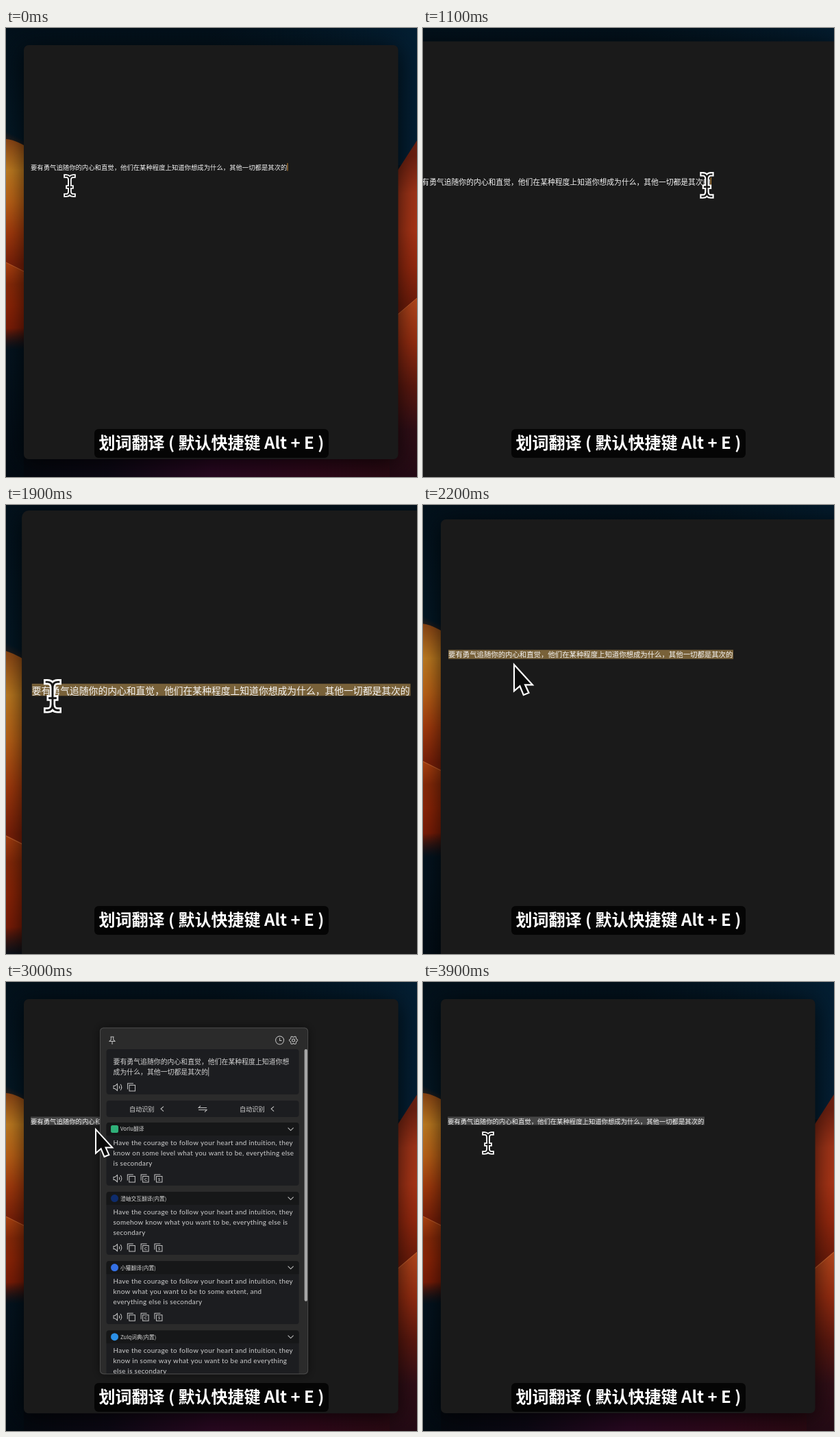
An HTML page with a canvas that plays this animation: 600 by 655 pixels, repeating every 4 s.

```html
<!DOCTYPE html>
<html lang="zh-CN">
<head>
<meta charset="utf-8">
<style>
html, body { margin: 0; width: 100%; height: 100%; overflow: hidden; background: #000; }
canvas { display: block; }
</style>
</head>
<body>
<canvas id="stage" width="600" height="655"></canvas>
<script>
const ctx = document.getElementById('stage').getContext('2d');
const CJK = '"Noto Sans CJK SC", "Noto Sans CJK", sans-serif';
const LATIN = 'Lato, "Noto Sans CJK SC", sans-serif';
const LOOP = 4000, PANEL_OPEN = 2300, PANEL_CLOSE = 3750, DRAG = 1150, DROP = 1550;
const SENTENCE = '要有勇气追随你的内心和直觉\uff0c他们在某种程度上知道你想成为什么\uff0c其他一切都是其次的';

const FIRST = 'Have the courage to follow your heart and intuition, they';
const services = [
  { name: 'Vorlu翻译', color: '#2fb079', square: true, start: 2300,
    lines: [FIRST, 'know on some level what you want to be, everything else', 'is secondary'] },
  { name: '澄岫交互翻译(内置)', color: '#0e2c6c', start: 2495,
    lines: [FIRST, 'somehow know what you want to be, everything else is', 'secondary'] },
  { name: '小獾翻译(内置)', color: '#3470e4', start: 2495,
    lines: [FIRST, 'know what you want to be to some extent, and', 'everything else is secondary'] },
  { name: 'Zulq词典(内置)', color: '#2b8fe6', start: 2620,
    lines: [FIRST, 'know in some way what you want to be and everything', 'else is secondary'] },
  { name: 'Nemvo翻译', color: '#dfe6ee', square: true, start: 2820, lines: [] }
];

const icons = {
  pin: 'M-2.5-5H2.5M-1.7-5V-1L-4 1.5H4L1.7-1V-5M0 1.5V6',
  clock: 'M6 0A6 6 0 1 1-6 0A6 6 0 1 1 6 0M0-3.5V.5H3',
  speaker: 'M-6-2H-4L-.5-5V5L-4 2H-6ZM2-2Q3.5 0 2 2M4-4.5Q7.5 0 4 4.5',
  copy: 'M-3-3H5.5V5.5H-3ZM-5.5 3V-5.5H3',
  swap: 'M6-1.5H-6L-3-4.5M-6 1.5H6L3 4.5',
  left: 'M2-3.5L-2 0L2 3.5',
  down: 'M-4-2L0 2L4-2'
};
for (const key in icons) icons[key] = new Path2D(icons[key]);
const beamPath = new Path2D('M-6-14H-5Q0-14 0-8V8Q0 14-5 14H-6M6-14H5Q0-14 0-8V8Q0 14 5 14H6M-3 2H3');
const arrowPath = new Path2D('M1 2V32L8 26L13 38L18 36L13 25H22Z');

const clamp = (v, lo, hi) => Math.min(hi, Math.max(lo, v));

// Critically damped spring going from 0 to 1
function spring(ms) {
  const x = Math.max(0, ms) * .0086;
  return 1 - (1 + x) * Math.exp(-x);
}

const cursorKeys = [
  [500, 93, 230], [1050, 406, 207], [DRAG, 406, 207], [DROP, 33, 206], [1750, 33, 206],
  [2200, 122.5, 216.5], [2450, 131, 215.5], [3400, 131, 215.5], [3700, 95, 235]
];
function cursorAt(t) {
  let a = cursorKeys[0], b = a;
  for (const key of cursorKeys) {
    a = b; b = key;
    if (key[0] >= t) break;
  }
  const p = clamp((t - a[0]) / (b[0] - a[0] || 1), 0, 1), e = p * p * (3 - 2 * p);
  return [a[1] + (b[1] - a[1]) * e, a[2] + (b[2] - a[2]) * e];
}

function text(str, x, y, size, color, family = CJK, weight = 400) {
  ctx.font = `${weight} ${size}px ${family}`;
  ctx.fillStyle = color;
  ctx.fillText(str, x, y);
}
function box(x, y, w, h, r, color) {
  ctx.beginPath();
  ctx.roundRect(x, y, w, h, r);
  ctx.fillStyle = color;
  ctx.fill();
}
function icon(name, x, y) {
  ctx.save();
  ctx.translate(x, y);
  ctx.strokeStyle = '#c4c4c4';
  ctx.lineWidth = 1;
  ctx.stroke(icons[name]);
  ctx.restore();
}
function gear(x, y) {
  ctx.beginPath();
  for (let i = 0; i <= 48; i++) {
    const a = i / 48 * Math.PI * 2, r = 5.4 + .8 * Math.cos(a * 6);
    ctx.lineTo(x + r * Math.cos(a), y + r * Math.sin(a));
  }
  ctx.moveTo(x + 2, y);
  ctx.arc(x, y, 2, 0, 7);
  ctx.strokeStyle = '#c4c4c4';
  ctx.lineWidth = 1;
  ctx.stroke();
}
function gradient(x0, y0, x1, y1, ...colors) {
  const g = ctx.createLinearGradient(x0, y0, x1, y1);
  colors.forEach((c, i) => g.addColorStop(i / (colors.length - 1), c));
  return g;
}
function shape(path, fill) {
  ctx.fillStyle = fill;
  ctx.fill(new Path2D(path));
}

function wallpaper() {
  ctx.fillStyle = gradient(0, 0, 0, 655, '#02101a', '#031724', '#031724', '#03121d', '#020a12');
  ctx.fillRect(0, 0, 600, 655);
  ctx.fillStyle = gradient(0, 0, 600, 0, '#03162200', '#03182600', '#031e32');
  ctx.fillRect(0, 0, 600, 200);
  ctx.fillStyle = gradient(0, 0, 600, 0, '#02080e', '#0c0814', '#2a0822', '#30081a', '#2a0a10');
  ctx.fillRect(26, 625, 574, 30);
  // left petals, soft at their outer ends
  shape('M0 145H40V375H0Z', gradient(0, 150, -14, 178, '#5a200800', '#8a4414'));
  shape('M0 162Q16 163 40 180V375H0Z', gradient(0, 162, 0, 345, '#8a4414', '#c07c20', '#bc6216', '#a43a0c', '#7c2008'));
  shape('M0 342L40 362V480H0Z', gradient(0, 342, 8, 470, '#b04410', '#8a2a08', '#8c2406', '#7c1c06', '#30100a00'));
  // right petals
  shape('M600 164L560 226V440H600Z', gradient(572, 190, 600, 400, '#6c2010', '#a03418', '#a83416', '#94280e', '#701c0a'));
  shape('M600 394L560 428V655H600Z', gradient(0, 394, 0, 650, '#b4481c', '#942c10', '#5c180e', '#300e16', '#240a14'));
  ctx.lineWidth = 1;
  ctx.strokeStyle = '#c4602c';
  ctx.stroke(new Path2D('M0 342L40 362M600 394L560 428'));
}

function editor(t) {
  ctx.save();
  ctx.shadowColor = 'rgba(0,0,0,.75)';
  ctx.shadowBlur = 34;
  ctx.shadowOffsetY = 6;
  box(26, 25, 546.5, 604, 7, '#1a1a1a');
  ctx.restore();
  if (t >= DRAG) {
    const x = clamp(cursorAt(Math.min(t, DROP))[0], 36, 411);
    ctx.fillStyle = t < PANEL_OPEN ? '#786139' : '#464646';
    ctx.fillRect(x, 196.5, 411 - x, 12);
  }
  text(SENTENCE, 36, 203, 9.375, '#f4f4f4');
  if (t < DRAG) {
    ctx.fillStyle = '#c98a35';
    ctx.fillRect(410.5, 197, 1, 11.5);
  }
}

function serviceCard(s, y, w, h, open) {
  ctx.save();
  ctx.beginPath();
  ctx.roundRect(146.5, y, w, h, 4);
  ctx.clip();
  ctx.fillStyle = '#1c1d20';
  ctx.fillRect(146, y, w + 1, h);
  ctx.fillStyle = '#161718';
  ctx.fillRect(146, y, w + 1, 19);
  box(153, y + 4, 11, 11, s.square ? 2.5 : 5.5, s.color);
  text(s.name, 167, y + 9.5, 7.75, '#d6d6d6');
  icon(open ? 'down' : 'left', 134.5 + w, y + 9.5);
  if (open) {
    ctx.letterSpacing = '.29px';
    s.lines.forEach((line, i) => text(line, 156.5, y + 30 + i * 14.8, 9.9, '#d0d0d0', LATIN));
    ctx.letterSpacing = '0px';
    ['speaker', 'copy', 'copy', 'copy'].forEach((name, i) => icon(name, 163 + i * 19.8, y + 81.5));
    text('C', 202, y + 83, 6, '#c4c4c4', LATIN, 700);
    text('S', 222, y + 83, 6, '#c4c4c4', LATIN, 700);
  } else {
    const x = 172 + ctx.measureText(s.name).width;
    [1.2, .8, 1.2].forEach((r, i) => box(x + i * 5.5 - r, y + 9.5 - r, r * 2, r * 2, r, '#b0b0b0'));
  }
  ctx.restore();
}

function panel(t) {
  const opened = services.map(s => 1 - (1 - clamp((t - s.start) / 200, 0, 1)) ** 2);
  const heights = opened.map(p => 19 + 73 * p);
  const end = heights.reduce((sum, h) => sum + h + 9, 205);
  const bottom = Math.min(572, end), scrolls = end > 572;
  const w = scrolls ? 281 : 285;

  ctx.save();
  ctx.shadowColor = 'rgba(0,0,0,.5)';
  ctx.shadowBlur = 14;
  box(137, 66.5, 304, bottom - 66.5, 5, '#2b2b2b');
  ctx.restore();
  ctx.save();
  ctx.beginPath();
  ctx.roundRect(137, 66.5, 304, bottom - 66.5, 5);
  ctx.clip();

  icon('pin', 155, 85);
  icon('clock', 399.5, 85);
  gear(419.5, 85);

  box(146.5, 98, w, 66, 4, '#1c1d20');
  const split = scrolls ? 26 : 27, rest = SENTENCE.slice(split);
  text(SENTENCE.slice(0, split), 156.5, 116, 9.9, '#d4d4d4');
  text(rest, 156.5, 131, 9.9, '#d4d4d4');
  ctx.fillRect(157 + ctx.measureText(rest).width, 124.5, .8, 13);
  icon('speaker', 163, 153.5);
  icon('copy', 183, 153.5);

  box(146.5, 173, w, 24, 4, '#1c1d20');
  const second = 341 + (w - 281) * .75;
  text('自动识别', 180, 185, 9.1, '#d4d4d4');
  text('自动识别', second, 185, 9.1, '#d4d4d4');
  icon('left', 228, 185);
  icon('left', second + 48, 185);
  icon('swap', 146.5 + w / 2, 185);

  let y = 205;
  services.forEach((s, i) => {
    serviceCard(s, y, w, heights[i], opened[i] > 0);
    y += heights[i] + 9;
  });
  if (scrolls) box(435.5, 98, 4.5, 474 * 474 / (end - 98), 2.2, '#a6a6a6');
  ctx.restore();

  ctx.beginPath();
  ctx.roundRect(137.5, 67, 303, bottom - 67.5, 5);
  ctx.strokeStyle = '#4b4b4b';
  ctx.lineWidth = 1;
  ctx.stroke();
}

function pointer(t) {
  const arrow = t > 2100 && t < 3580;
  ctx.save();
  ctx.translate(...cursorAt(t));
  ctx.strokeStyle = '#fff';
  if (arrow) {
    ctx.lineWidth = 4;
    ctx.stroke(arrowPath);
    ctx.fillStyle = '#0a0a0a';
    ctx.fill(arrowPath);
  } else {
    ctx.lineCap = 'square';
    ctx.lineWidth = 5.6;
    ctx.stroke(beamPath);
    ctx.strokeStyle = '#161616';
    ctx.lineWidth = 2;
    ctx.stroke(beamPath);
  }
  ctx.restore();
}

function draw(t) {
  const zoom = .49 * (spring(t - 969) - spring(t - 1870));
  const focusX = 26 + 325 * (1 - spring(t - 1215)), focusY = 61;

  ctx.setTransform(1 + zoom, 0, 0, 1 + zoom, -zoom * focusX, -zoom * focusY);
  ctx.textBaseline = 'middle';
  ctx.textAlign = 'left';
  wallpaper();
  editor(t);
  if (t >= PANEL_OPEN && t < PANEL_CLOSE) panel(t);
  pointer(t);

  ctx.setTransform(1, 0, 0, 1, 0, 0);
  box(129, 585, 342, 42, 6, '#050505');
  ctx.textAlign = 'center';
  text('划词翻译 ( 默认快捷键 Alt + E )', 300, 605, 24, '#fff', CJK, 700);
}

function frame() {
  draw(performance.now() % LOOP);
  requestAnimationFrame(frame);
}
frame();
</script>
</body>
</html>
```
